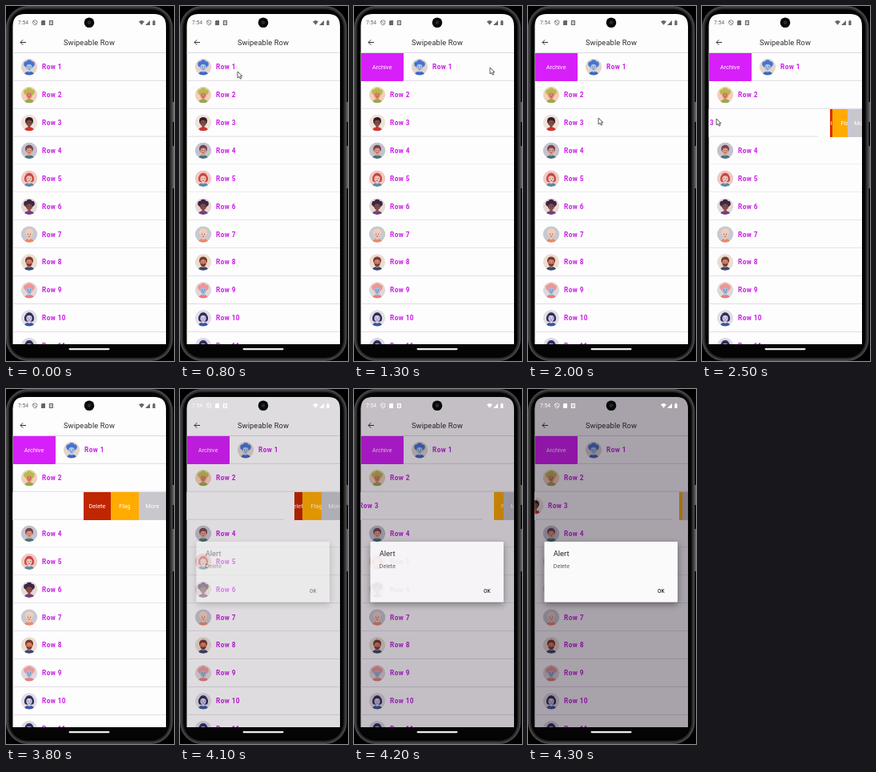
These frames come from a looping animation (210x444 px, 4.4 s). An HTML page:

```html
<!DOCTYPE html>
<html lang="en">
<head>
<meta charset="utf-8">
<title>Swipeable Row</title>
<style>
  html, body { margin: 0; width: 100%; height: 100%; overflow: hidden; background: #000; }
  svg { display: block; width: 210px; height: 444px; font-family: Roboto, sans-serif; }
  .name { font-size: 8.2px; font-weight: 700; fill: #c91be6; letter-spacing: .45px; }
  .action { font-size: 7.47px; fill: #fff; text-anchor: middle; }
  .crisp { shape-rendering: crispEdges; }
</style>
</head>
<body>
<svg viewBox="0 0 210 444">
  <defs>
    <clipPath id="screen"><path d="M8.5 423V25Q8.5 10 23.5 10H185Q200 10 200 25V423Z"/></clipPath>
    <clipPath id="face"><circle r="10.3"/></clipPath>
    <filter id="shadow" x="-20%" y="-20%" width="140%" height="150%">
      <feDropShadow dx="0" dy="3" stdDeviation="4" flood-opacity=".4"/>
    </filter>
  </defs>

  <path d="M209 120v25M209 175v53" stroke="#666" stroke-width="2"/>
  <rect width="208.5" height="444" rx="27" fill="#454545"/>
  <rect x="2" y="2" width="204.5" height="440" rx="25" fill="#2a2a2a"/>
  <rect x="4" y="4" width="200.5" height="436" rx="23" fill="#040404"/>

  <g clip-path="url(#screen)">
    <rect width="210" height="444" fill="#fefdfe"/>
    <path d="M25 45.5h-7m3.2-3.2l-3.2 3.2 3.2 3.2" fill="none" stroke="#333" stroke-width="1"/>
    <text x="104" y="49" text-anchor="middle" font-size="9.3" letter-spacing=".1" fill="#2b2a2e">Swipeable Row</text>
    <path d="M8 58.5h192" stroke="#d8d4de" stroke-width=".9"/>
    <g id="list"></g>
    <path id="cursor" d="M0 0v8l2-1.6 1.4 2.8 1.4-.7-1.4-2.7h2.5Z" fill="#fff" stroke="#333" stroke-width=".8"/>
    <rect id="dim" width="210" height="444" fill="#160a1c"/>
    <g id="alert">
      <rect x="20.5" y="191" width="166.5" height="75.5" rx="1" fill="#fbfafb" filter="url(#shadow)"/>
      <text x="31.7" y="209" font-size="9.33" fill="#222">Alert</text>
      <text x="31.7" y="223.8" font-size="7" letter-spacing=".1" fill="#555">Delete</text>
      <text x="162" y="255.3" font-size="6.5" font-weight="500" fill="#222">OK</text>
    </g>
  </g>

  <g id="status">
    <text x="15" y="23.4" font-size="6.7">7:54</text>
    <path d="M36.2 17.8l2.6 1v2q0 2-2.6 3.2-2.6-1.2-2.6-3.2v-2ZM34.4 19l3.6 4" fill="none" stroke="currentColor" stroke-width=".8"/>
    <path d="M45 18h4v6h-5v-5ZM166 19.4q3.5-3 7 0l-3.5 4.4ZM180 18v6h-6ZM183.3 18.7h.8v-.9h1.6v.9h.8v5.3h-3.2Z"/>
    <path d="M54.4 18.6h4v4.8h-4ZM55.4 21h2" fill="none" stroke="currentColor" stroke-width="1.1"/>
  </g>
  <circle cx="104" cy="20.7" r="6.3" fill="#080808"/>
  <circle cx="104" cy="20.7" r="2.4" fill="#252a2b"/>
  <rect x="78.5" y="428" width="51" height="2.2" rx="1.1" fill="#eee"/>
</svg>
<script>
const LOOP = 4400, STEP = 100, LEFT = 8.5, RIGHT = 200, PITCH = 34.9, TOP = 58.8;
const ACTION = 34.4, OPEN_LEFT = 53, OPEN_RIGHT = 3 * ACTION;
const $ = id => document.getElementById(id);
const clamp = v => Math.max(0, Math.min(1, v));

// background, hair, skin, shirt, hair style
const people = [
  ['#e2d5cb', '#4674d2', '#a9c8ee', '#3f66c0', 'puffy'],
  ['#f0d0bc', '#b4bd4c', '#e8836e', '#90ac48', 'puffy'],
  ['#eee2dc', '#2f2024', '#8a4a3c', '#d0342e', 'short'],
  ['#c5c2ce', '#74444c', '#dd9c84', '#41747f', 'short'],
  ['#eecac4', '#cb4844', '#f3c8ba', '#5a86ac', 'long'],
  ['#e6d8d5', '#3d2646', '#874c44', '#6f4084', 'puffy'],
  ['#c9c8d1', '#f0d0c0', '#f2c6b0', '#e98a6a', 'short'],
  ['#eaddd2', '#7b3a32', '#dd886a', '#34486f', 'bearded'],
  ['#e0d6dc', '#ee9694', '#9cbfe4', '#e87f78', 'puffy'],
  ['#e2dde4', '#2c2e5c', '#d2cce8', '#3a559e', 'long'],
  ['#dcd8e2', '#2c2e5c', '#a4aade', '#c0505c', 'long']
];

const styles = {
  short: () => '',
  puffy: hair => `<g fill="${hair}"><circle cx="-3.4" cy="-3.4" r="3.4"/>
    <circle cx="3.4" cy="-3.4" r="3.4"/><circle cy="-5.4" r="3.4"/></g>`,
  long: hair => `<rect x="-6" y="-4" width="12" height="8.5" rx="3.5" fill="${hair}"/>`,
  bearded: () => ''
};

function avatar([back, hair, skin, shirt, style], y) {
  const beard = style == 'bearded' ? `<path d="M-3.7 1.2q3.7 2 7.4 0-.4 4.4-3.7 4.4t-3.7-4.4Z" fill="${hair}"/>` : '';
  return `<g transform="translate(29 ${y})" clip-path="url(#face)">
    <circle r="10.3" fill="${back}"/>
    <circle cy="-2" r="5" fill="${hair}"/>${styles[style](hair)}
    <ellipse cy="10" rx="6.4" ry="4.4" fill="${shirt}"/>
    <rect x="-1.5" y="2" width="3" height="4.6" fill="${skin}"/>
    <ellipse cy=".4" rx="3.6" ry="4" fill="${skin}"/>
    <path d="M-3.8-1.4q2-2.6 4-1.8 2.6-.2 3.6 1.8v-2.4q-3.6-3.4-7.6 0Z" fill="${hair}"/>${beard}
    <path d="M-2 0h.9M1.1 0h.9" stroke="#33232e" stroke-width=".8"/>
    <path d="M-1.2 2.4q1.2.8 2.4 0" stroke="#b83c3c" stroke-width=".8" fill="none"/>
  </g>`;
}

function action(id, label, color, width, y) {
  return `<g id="${id}"><rect class="crisp" y="${y}" width="${width + .3}" height="${PITCH}" fill="${color}"/>
    <text class="action" x="${width / 2}" y="${y + 20}">${label}</text></g>`;
}

$('list').innerHTML = people.map((look, i) => {
  const y = TOP + i * PITCH;
  const under = i == 0 ? action('archive', 'Archive', '#d71ffa', OPEN_LEFT, y)
    : i == 2 ? action('delete', 'Delete', '#dd2c00', ACTION, y)
      + action('flag', 'Flag', '#ffab00', ACTION, y)
      + action('more', 'More', '#c8c7cd', ACTION, y) : '';
  return `${under}<g id="row${i}">
    <rect id="cover${i}" class="crisp" x="${LEFT}" y="${y}" width="${RIGHT - LEFT}" height="${PITCH}" fill="#fefdfe"/>
    <path d="M${LEFT} ${y + PITCH - .4}H${RIGHT}" stroke="#dcd8e2" stroke-width=".9"/>
    ${avatar(look, y + 17.3)}
    <text class="name" x="45" y="${y + 20.3}">Row ${i + 1}</text></g>`;
}).join('');

// Linear interpolation through [time, ...values] stops
function track(stops, t) {
  let k = 0;
  while (k < stops.length - 2 && t >= stops[k + 1][0]) k++;
  const [a, b] = [stops[k], stops[k + 1]];
  const f = clamp((t - a[0]) / (b[0] - a[0]));
  return a.slice(1).map((v, n) => v + (b[n + 1] - v) * f);
}

const pointer = [[700, 66, 98], [800, 72, 82], [900, 92, 77], [1200, 166, 76], [1300, 170, 77],
  [1400, 168, 84], [1800, 112, 122], [2000, 88, 140], [2400, 31, 142], [2500, 18, 141],
  [2600, 4, 140], [2800, 10, 137], [3000, 72, 125], [3100, 102, 133.5], [3300, 114, 144]];
const firstSwipe = [[800, 0], [900, 12], [1000, 30], [1100, 46], [1200, OPEN_LEFT]];
const thirdSwipe = [[2000, 0], [2200, 16], [2400, 42], [2500, 55], [2600, OPEN_RIGHT],
  [4000, OPEN_RIGHT], [4100, 70], [4200, 39], [4300, 20]];

const shift = (id, x, y = 0) => $(id).setAttribute('transform', `translate(${x} ${y})`);
const show = (id, on) => $(id).style.display = on ? '' : 'none';

function draw(t) {
  const [right] = track(firstSwipe, t), [left] = track(thirdSwipe, t);
  const p = left / OPEN_RIGHT;
  shift('row0', right);
  shift('archive', LEFT - 20 * (1 - right / OPEN_LEFT));
  show('archive', right > 0);
  shift('row2', -left);
  // the moving row trails slightly over the first button
  $('cover2').setAttribute('width', RIGHT - LEFT + 15 * Math.sin(Math.PI * p));
  ['more', 'flag', 'delete'].forEach((id, n) => {
    shift(id, RIGHT - (n + 1) * ACTION * p);
    show(id, left > 0);
  });
  $('delete').firstChild.setAttribute('fill', t >= 3700 ? '#c02600' : '#dd2c00');

  shift('cursor', ...track(pointer, t));
  show('cursor', t >= 700 && t < 3500);

  const ink = t > 4000 ? '#fff' : '#666';
  $('dim').setAttribute('opacity', clamp((t - 3990) / 830));
  $('alert').setAttribute('opacity', clamp((t - 4000) / 220));
  $('status').setAttribute('fill', ink);
  $('status').setAttribute('color', ink);
}

const start = performance.now();
function tick() {
  const t = (performance.now() - start) % LOOP;
  draw(Math.floor(t / STEP) * STEP);
  requestAnimationFrame(tick);
}
tick();
</script>
</body>
</html>
```
